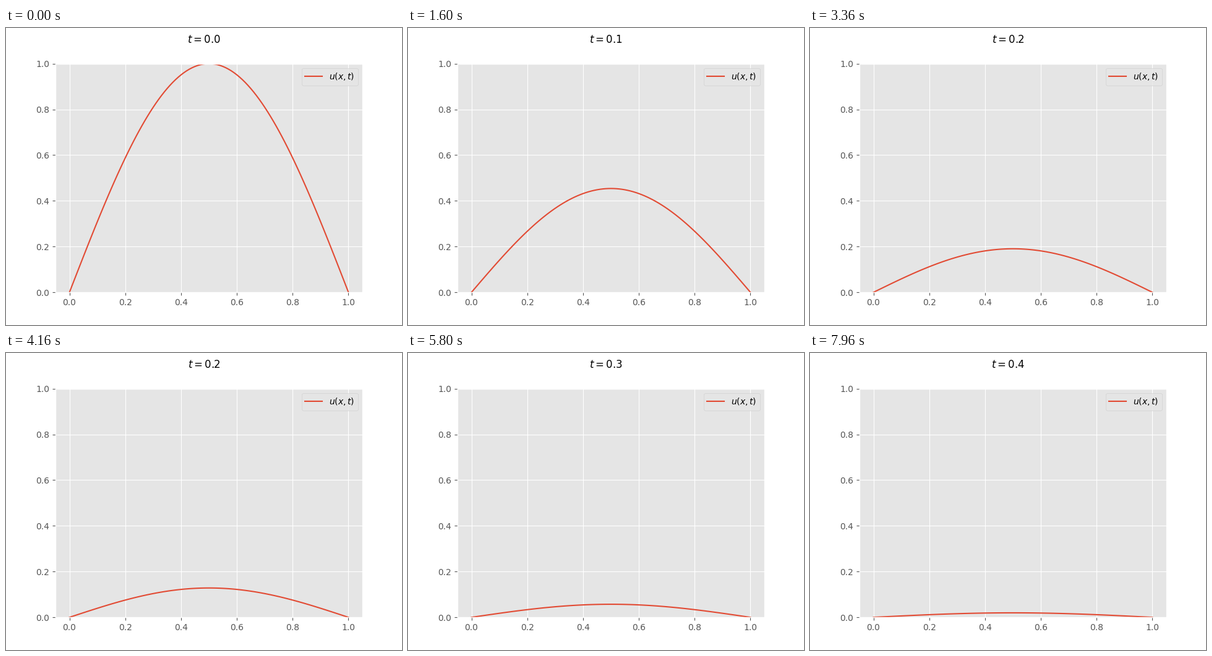
A matplotlib script for the animation above (8000 ms loop, 640 px wide and 480 px high).

```python
import numpy as np
import matplotlib.pyplot as plt
from matplotlib.animation import FuncAnimation

FRAMES = 200
INTERVAL = 40   # ms
DT = 0.002      # model time per frame

plt.style.use("ggplot")

x = np.linspace(0, 1, 101)


def heat(t):
    """Heat equation solution for a half-sine start with cold ends."""
    return np.exp(-np.pi**2 * t) * np.sin(np.pi * x)


fig, ax = plt.subplots(figsize=(6.4, 4.8), dpi=100)
line, = ax.plot(x, heat(0), label="$u(x, t)$")
ax.set_xlim(-0.05, 1.05)
ax.set_ylim(0, 1)
ax.legend(loc="upper right")
title = fig.suptitle("$t = 0.0$")


def update(frame):
    t = frame * DT
    line.set_ydata(heat(t))
    title.set_text(f"$t = {t:.1f}$")
    return line, title


anim = FuncAnimation(fig, update, frames=FRAMES, interval=INTERVAL,
                     repeat=True, repeat_delay=0, blit=False)

plt.show()
```
